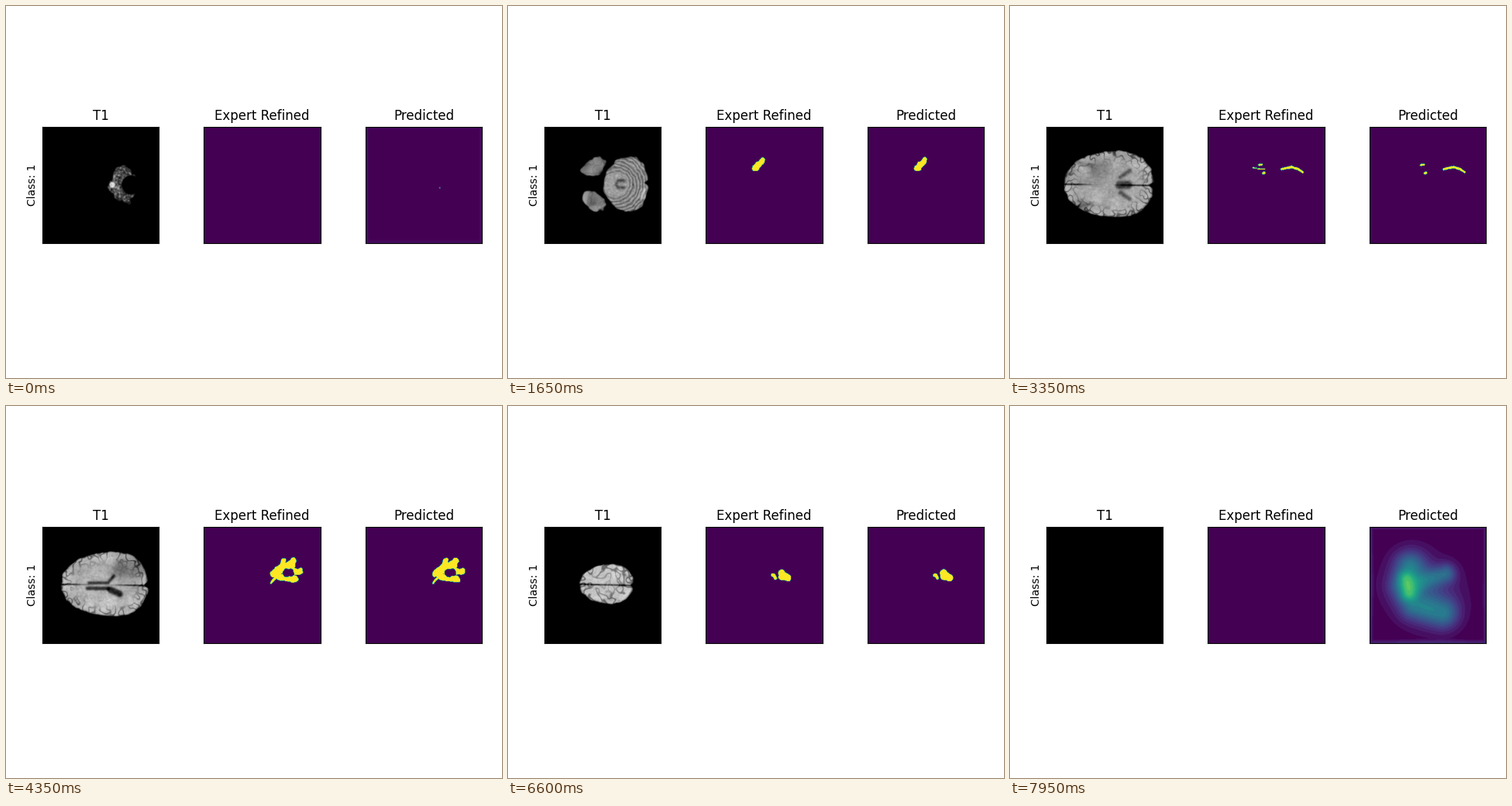
A matplotlib script for the animation above (8000 ms loop, 640x480 px).

```python
import numpy as np
import matplotlib.pyplot as plt
from matplotlib.animation import FuncAnimation

W, H, DPI = 640, 480, 100
FRAMES, STEP = 160, 50
N, SIDE = 240, 150.4
MID = 75.5

rng = np.random.default_rng(4)
axis = (np.arange(N) + 0.5) * SIDE / N
X, Y = np.meshgrid(axis, axis)


def ramp(t, t0, t1):
    return np.clip((t - t0) / (t1 - t0), 0, 1)


# ---------- smooth random fields that drift through the slices ----------
def smooth_noise(scale):
    f = np.fft.fftfreq(N, SIDE / N)
    k = np.exp(-2 * (np.pi * scale) ** 2 * (f[:, None] ** 2 + f[None, :] ** 2))
    z = np.fft.ifft2(np.fft.fft2(rng.standard_normal((N, N))) * k).real
    return z / z.std()


def drift(scale, period):
    a, b = smooth_noise(scale), smooth_noise(scale)
    return lambda t: (a * np.cos(2 * np.pi * t / period)
                      + b * np.sin(2 * np.pi * t / period))


folds = drift(2.2, 3600)
grain = drift(0.8, 900)
cloud = drift(5, 4000)
ragged = drift(1.8, 1500)


# ---------- shapes ----------
def dist(*pts):
    """Distance to a polyline, or to a single point."""
    d = np.full((N, N), 1e9)
    for (x0, y0), (x1, y1) in zip(pts, pts[1:] or pts):
        dx, dy = x1 - x0, y1 - y0
        u = ((X - x0) * dx + (Y - y0) * dy) / max(dx * dx + dy * dy, 1e-9)
        u = np.clip(u, 0, 1)
        d = np.minimum(d, np.hypot(X - x0 - u * dx, Y - y0 - u * dy))
    return d


def soft(r, edge, *pts):
    return 1 / (1 + np.exp(np.clip((dist(*pts) - r) / edge, -30, 30)))


def glow(s, amp, *pts):
    return amp * np.exp(-(dist(*pts) / s) ** 2 / 2)


def paint(img, val, depth):
    alpha = np.clip(depth + 0.5, 0, 1)
    val = val * np.clip(.55 + depth / 4, 0, 1)
    return img * (1 - alpha) + np.clip(val, 0.03, 1) * alpha


# ---------- lesion masks ----------
def lesion_stages(noise, debris):
    """Signed fields, positive inside; debris adds the thin hand-drawn bits."""
    def blob(r, *pts):
        return r * (1 + .2 * noise) - dist(*pts)

    def union(*parts):
        return np.maximum.reduce(parts)

    temporal_blob = union(blob(4.5, (65, 52), (71, 48)), blob(2.5, (62, 55), (74, 42)))
    strip = blob(4.5, (65, 50), (90, 51))
    arc = union(blob(1.5, (95, 55.5), (102, 53.5), (109, 53), (116, 55), (122, 59)),
                blob(1.4, (66, 50), (70, 49.5)), blob(1.6, (71, 60.5), (72.5, 60)))
    ring = union(blob(6, (92, 60), (98, 54), (111, 51)), blob(4, (97, 65), (118, 68)),
                 blob(4, (118, 58), (125, 58)), blob(3, (103, 44), (103, 50)),
                 blob(3, (116, 44), (113, 50)), blob(1.8, (92, 67), (87, 73)))
    ring = np.minimum(ring, -blob(5.5, (108, 60), (110, 60)))
    fork = union(blob(7.5, (88, 60), (93, 59)), blob(3, (83, 51), (87, 56)),
                 blob(3, (94, 43), (95, 51)), blob(3, (96, 53), (105, 50)),
                 blob(3, (97, 62), (104, 67)), blob(3, (84, 67), (89, 67)))
    island = union(blob(4.5, (97, 60), (99, 64)), blob(4.5, (98, 64), (106, 66)),
                   blob(2, (86, 63), (88, 63), (90, 67)))
    if debris:
        arc = union(arc, blob(.7, (58, 53.5), (63, 54)), blob(.7, (65, 55), (73, 55)))
        for r in (6, 13):
            shell = .7 - np.abs(np.hypot(X - 111, Y - 61) - r) - .5 * (noise > .6)
            fork = union(fork, np.where(X > 103, shell, -4))
    else:
        fork = union(fork, blob(3, (102, 52), (114, 50)), blob(2, (103, 66), (109, 71)))
    seed, last = -3 - dist((68, 49)), -3 - dist((98, 63))
    times = 1150, 1650, 2350, 3350, 4350, 5500, 6600, 7300
    fields = seed, temporal_blob, strip, arc, ring, fork, island, last
    return list(zip(times, [np.clip(f, -4, 4) for f in fields]))


def mask(stages, t):
    for (t0, a), (t1, b) in zip(stages, stages[1:]):
        if t0 <= t < t1:
            u = (t - t0) / (t1 - t0)
            f = (1 - u) * a + u * b + .8 * np.sin(np.pi * u) * ragged(t)
            return (f > 0).astype(float)
    return np.zeros((N, N))


outline = smooth_noise(1.7)
expert = lesion_stages(outline, True)
model = lesion_stages(.8 * outline + .5 * smooth_noise(2.2), False)


# ---------- anatomy ----------
def egg(cx, cy, a, b, taper, power):
    u = (X - cx) / a
    v = (Y - cy) / (b * np.maximum(1 + taper * u, .3))
    rad = (np.abs(u) ** power + np.abs(v) ** power) ** (1 / power)
    return (1 - rad) * min(a, b), u


fourth = soft(1.8, .7, (102, 70), (95, 70), (92, 75), (95, 79), (102, 79))
bright_rim = soft(2, 1.5, (129, 82), (126, 91))
medulla = soft(4, .4, (90, MID))

# peak time, darkness, shape
dark_parts = [
    (3350, .4, soft(5, .8, (94, MID), (105, MID))),
    (3350, .14, soft(10, 3, (66, 56), (72, 58))),
    (4350, .5, soft(1.8, .6, (60, 73), (84, 73), (92, 64))),
    (4350, .55, soft(2.2, .6, (58, 80), (84, 80))),
    (4350, .55, soft(4, .7, (88, 82), (99, 87))),
    (4350, .24, soft(13, 4, (106, 54), (118, 52))),
    (5500, .28, soft(9, 2, (84, 56), (117, 56))),
]
for side in (-1, 1):
    dark_parts += [
        (3350, .3, soft(2.4, .7, (95, MID + 10 * side), (107, MID + 18 * side))),
        (3350, .2, soft(2.5, 1, (40, MID + 29 * side), (58, MID + 24 * side))),
    ]


def cerebellum(img, t):
    grow, n, g = t / 1650, folds(t), grain(t)
    young = 1 - ramp(t, 0, 900)
    d, _ = egg(102.5 + 2 * grow, 74.5, 16.5 + 12 * grow, 24.5 + 10.5 * grow, .15, 2.1)
    d += .6 * n * (1 + young) - 4 * np.exp(-((Y - 73) / 3) ** 2) * (X > 115)
    d = np.minimum(d, np.hypot(X - 114, Y - MID) - 12 * young)
    rho = np.hypot(X - 92, Y - MID)
    stripes = (.5 + .5 * np.sin(rho * 1.5 + .9 * n)) * ramp(rho, 13, 19)
    val = .62 - .22 * stripes + .03 * g + .25 * bright_rim
    val -= .34 * fourth * ramp(t, 900, 1400)
    val *= (.55 + .45 * ramp(t, 0, 1650)) * (1 + .25 * young * g)
    stem = medulla * (1 - ramp(t, 700, 1100))
    return np.maximum(paint(img, val, d), stem * (.82 + .04 * g))


def temporal(img, t):
    s = .05 + 1.2 * ramp(t, 850, 2150)
    s = min(s * 1.25, 1.2)
    n = folds(t)
    for cy, tilt, tone in ((53, -.55, .46), (96, .55, .57)):
        c, k = np.cos(tilt), np.sin(tilt)
        p = (X - 63.5) * c + (Y - cy) * k
        q = (Y - cy) * c - (X - 63.5) * k
        d = (1 - np.hypot(p / (16.5 * s), q / (11 * s))) * 11 * s + .8 * n
        val = tone + .06 * cloud(t) - .08 * np.exp(-(n / .4) ** 2)
        img = paint(img, val, d)
    return img


def cerebrum(img, t):
    # slices of an ellipsoid, steeper below its widest level than above
    s = (t - 3400) / (1700 if t < 3400 else 4000)
    size = np.sqrt(1 - s * s)
    n = folds(t)
    sulci = np.exp(-(n / .42) ** 2)
    d, u = egg(80, 74.5, 57.5 * size, 42 * size, .13, 2.25)
    d = d + .4 * n - 4 * np.exp(-((Y - 76) / 2.5) ** 2) * np.clip(u * 3 - 2, 0, 1)
    late = ramp(t, 4300, 6600)
    rim = np.exp(-(np.maximum(d, 0) / (9 + 9 * late)) ** 2)
    val = .62 + .15 * ramp(t, 2800, 5500) + .03 * cloud(t) + .02 * grain(t)
    val -= .36 * sulci * rim + .04 * sulci
    split = np.maximum(ramp(t, 4500, 5300), np.clip(np.abs(u + .1) * 2 - .3, 0, 1))
    val -= .5 * np.exp(-((Y - MID - .8 * u) / 1.1) ** 2) * split
    for peak, amount, shape in dark_parts:
        val = val - amount * np.exp(-((t - peak) / 550) ** 2) * shape
    return paint(img, val, d)


def scan(t):
    img = np.zeros((N, N))
    if t < 2300:
        img = cerebellum(img, t)
    if 850 < t < 2300:
        img = temporal(img, t)
    if 1750 <= t < 7400:
        img = cerebrum(img, t)
    return img


# ---------- prediction outside the head ----------
edge = np.minimum(np.minimum(X, SIDE - X), np.minimum(Y, SIDE - Y))
border = np.clip(1 - edge / 6, 0, 1)
layers = (glow(14, .38, (52, 52), (46, 76), (58, 101), (94, 112)),
          glow(7, .45, (47, 68), (50, 86)),
          glow(9, .32, (58, 75), (98, 61)),
          glow(30, .16, (62, 76), (78, 88)))
haze = 1 - np.prod([1 - a for a in layers], axis=0)
speck = glow(.5, .9, (95.3, 79.3))


def prediction(t):
    if t >= 7400:
        f = haze * (.85 + .15 * ramp(t, 7400, 7950)) + .14 * border
        return np.floor(f * 24) / 24
    return (mask(model, t) + speck * np.exp(-t / 60)
            + .04 * border * (1 - ramp(t, 0, 1100)))


# ---------- figure ----------
fig = plt.figure(figsize=(W / DPI, H / DPI), dpi=DPI, facecolor="white")
images = []
for i, title in enumerate(("T1", "Expert Refined", "Predicted")):
    ax = fig.add_axes([(47 + 208.4 * i) / W, 173.8 / H, SIDE / W, SIDE / H])
    ax.set(xticks=[], yticks=[])
    ax.set_title(title, fontsize=12)
    if i == 0:
        ax.set_ylabel("Class: 1", fontsize=10)
    images.append(ax.imshow(np.zeros((N, N)), cmap="viridis" if i else "gray",
                            vmin=0, vmax=1, aspect="auto"))


def draw(i):
    t = i * STEP
    for im, data in zip(images, (scan(t), mask(expert, t), prediction(t))):
        im.set_data(data)
    return images


anim = FuncAnimation(fig, draw, frames=FRAMES, interval=STEP, repeat=True,
                     repeat_delay=0, blit=False)
plt.show()
```
